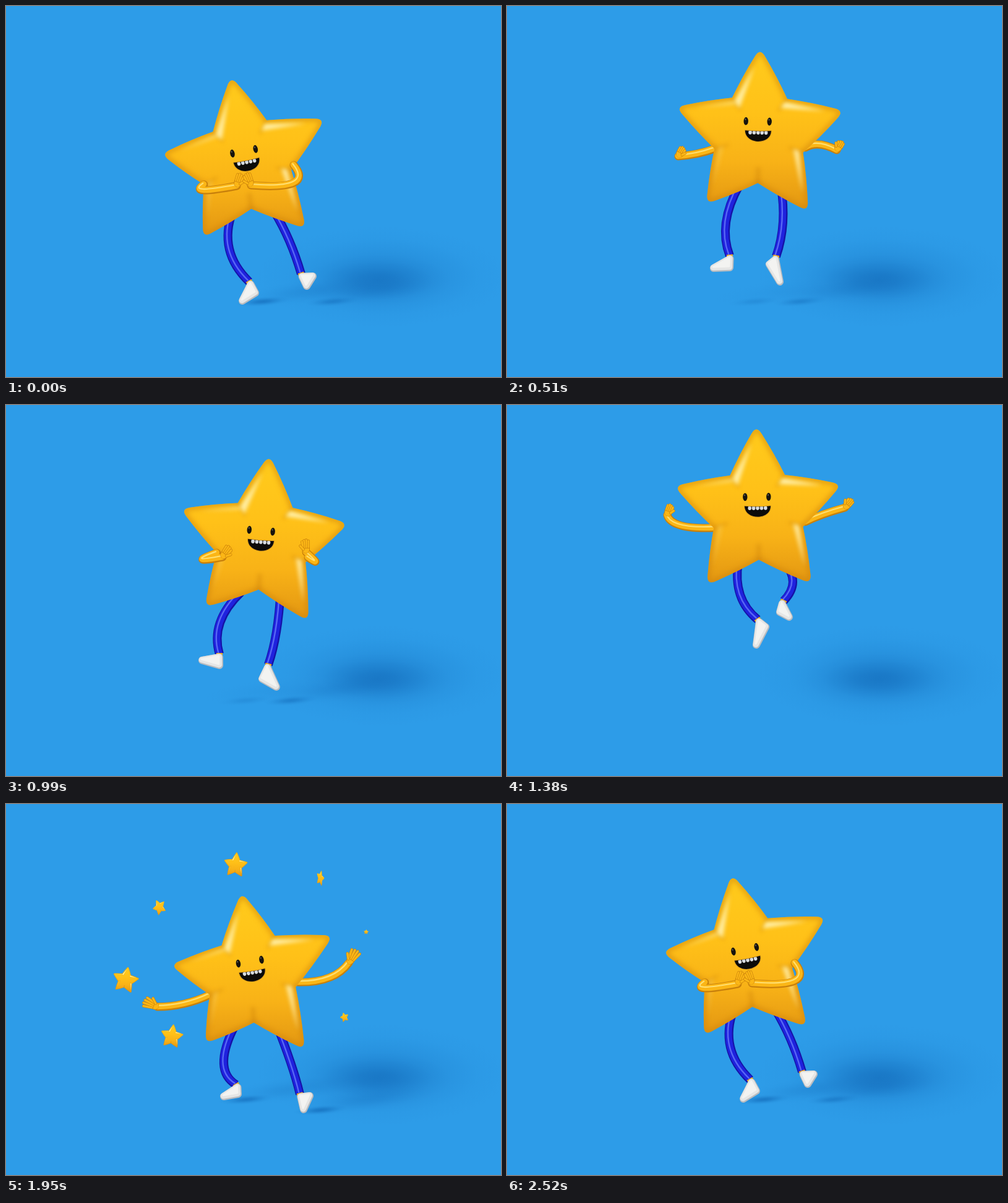
Animation, 800 px wide and 600 px high, one loop 2550 ms. Source, as an HTML page with a canvas:

```html
<!DOCTYPE html>
<html lang="en">
<head>
<meta charset="utf-8">
<title>Dancing star</title>
<style>
  html, body { margin: 0; width: 100%; height: 100%; overflow: hidden; background: #2d9ce8; }
  canvas { display: block; width: 800px; height: 600px; }
</style>
</head>
<body>
<canvas id="stage" width="800" height="600"></canvas>
<script>
const ctx = document.getElementById('stage').getContext('2d');
const LOOP = 2550, STEP = 30, TAU = Math.PI * 2;

// ---- Poses ----
// tips: top, right, lower right, lower left, left
// face: offset y, joy, hip spread
// arm: elbow, wrist, hand angle, openness, in front
// leg: knee, ankle, heel, toe
const clap = {
  tips: [364,119, 511,185, 481,356, 321,370, 256,240], face: [-19, 1, 1],
  armL: [320,298, 373,291, 290, .7, 1], armR: [465,286, 396,290, -112, .7, 1],
  legL: [361,393, 393,446, 403,464, 382,477], legR: [458,380, 477,433, 496,437, 486,453]
};
const hop = {
  tips: [409,73, 540,171, 484,328, 325,316, 278,165], face: [-24, 1, 1],
  armL: [307,239, 277,243, 300, .4, 0], armR: [505,224, 533,233, -60, .4, 0],
  legL: [354,350, 360,404, 360,423, 334,424], legR: [446,350, 435,405, 424,418, 441,446]
};
const lean = {
  tips: [425,86, 548,193, 486,345, 325,323, 287,170], face: [-20, 1, .95],
  armL: [318,250, 350,246, 305, .7, 1], armR: [500,253, 485,238, -95, .7, 1],
  legL: [346,352, 345,403, 345,421, 317,413], legR: [437,367, 424,420, 414,443, 437,456]
};
const leap = {
  tips: [403,38, 536,130, 489,285, 326,287, 275,133], face: [-26, 1, 1.1],
  armL: [281,195, 259,178, 290, .5, 0], armR: [511,177, 546,166, -50, .5, 0],
  legL: [377,307, 405,347, 418,359, 403,388], legR: [462,286, 447,317, 441,335, 456,343]
};
const sneeze = {
  tips: [351,141, 508,198, 460,391, 323,367, 258,264], face: [-9, 0, .25],
  armL: [291,310, 262,320, 155, 0, 0], armR: [472,291, 416,301, -160, 0, 1],
  legL: [371,405, 411,441, 426,455, 397,468], legR: [382,405, 369,460, 364,485, 335,491]
};
const burst = {
  tips: [381,148, 524,215, 480,393, 325,383, 271,261], face: [-25, 1, 1],
  armL: [288,323, 245,328, 202, 1, 0], armR: [522,281, 554,257, -58, 1, 0],
  legL: [352,418, 372,454, 375,469, 352,473], legR: [460,418, 475,469, 491,472, 481,494]
};

const shift = (a, n, dx, dy) => a.map((v, i) => i < n ? v + (i % 2 ? dy : dx) : v);
const move = (p, dx, dy) => ({
  tips: shift(p.tips, 10, dx, dy), face: p.face,
  armL: shift(p.armL, 4, dx, dy), armR: shift(p.armR, 4, dx, dy),
  legL: shift(p.legL, 8, dx, dy), legR: shift(p.legR, 8, dx, dy)
});
const flip = (a, n) => a.map((v, i) => i < n && i % 2 === 0 ? 808 - v : v);
const flipArm = (a, turn) => flip(a, 4).map((v, i) => i === 4 ? turn - v : v);
const mirror = p => {
  const m = flip(p.tips, 10);
  return {
    tips: [0, 4, 3, 2, 1].flatMap(i => [m[2 * i], m[2 * i + 1]]), face: p.face,
    armL: flipArm(p.armR, 180), armR: flipArm(p.armL, 180),
    legL: flip(p.legR, 8), legR: flip(p.legL, 8)
  };
};

const crouch = { ...move(leap, 0, 95), legL: burst.legL, legR: burst.legR };
const land = { ...move(leap, -25, 105), legL: burst.legL, legR: shift(sneeze.legR, 8, 8, 24) };
const tense = { ...move(sneeze, 1, 5), legL: sneeze.legL, legR: sneeze.legR };

const keys = [
  [0, clap], [170, mirror(hop)], [345, mirror(clap)], [510, hop], [690, clap],
  [850, mirror(hop)], [990, lean], [1050, mirror(clap)], [1150, crouch], [1380, leap],
  [1610, land], [1740, sneeze], [1830, tense], [1950, burst], [2130, burst],
  [2340, move(hop, 0, 18)], [2520, clap]
];

// Monotone cubic interpolation, so extremes stay at the keys.
const tangent = (a, b) => a * b <= 0 ? 0 : 2 * a * b / (a + b);
function poseAt(t) {
  t = Math.min(t, 2520);
  let i = 0;
  while (i < keys.length - 2 && t >= keys[i + 1][0]) i++;
  const [k0, k1, k2, k3] = [-1, 0, 1, 2].map(d => keys[Math.max(0, Math.min(keys.length - 1, i + d))]);
  const h = k2[0] - k1[0], u = (t - k1[0]) / h, out = {};
  const slope = (a, b, part, j) => a === b ? 0 : (b[1][part][j] - a[1][part][j]) / (b[0] - a[0]);
  for (const part in k1[1]) {
    out[part] = k1[1][part].map((v, j) => {
      const s = slope(k1, k2, part, j);
      const m1 = tangent(slope(k0, k1, part, j), s) * h;
      const m2 = tangent(s, slope(k2, k3, part, j)) * h;
      const w = k2[1][part][j], d = w - v;
      return v + u * (m1 + u * (3 * d - 2 * m1 - m2 + u * (m1 + m2 - 2 * d)));
    });
  }
  return out;
}

// ---- Drawing helpers ----
const mix = (a, b, k) => [a[0] + (b[0] - a[0]) * k, a[1] + (b[1] - a[1]) * k];
const pairs = a => a.slice(0, a.length & ~1).reduce((r, v, i) => (i % 2 ? r[r.length - 1].push(v) : r.push([v]), r), []);
const unit = (a, b) => {
  const l = Math.hypot(b[0] - a[0], b[1] - a[1]) || 1;
  return [(b[0] - a[0]) / l, (b[1] - a[1]) / l];
};

function line(color, width, trace) {
  ctx.strokeStyle = color;
  ctx.lineWidth = width;
  ctx.beginPath();
  trace();
  ctx.stroke();
}

function oval(x, y, rx, ry, color, turn = 0) {
  ctx.fillStyle = color;
  ctx.beginPath();
  ctx.ellipse(x, y, rx, ry, turn, 0, TAU);
  ctx.fill();
}

function softOval(x, y, rx, ry, alpha, turn = 0) {
  ctx.save();
  ctx.translate(x, y);
  ctx.rotate(turn);
  ctx.scale(rx, ry);
  const g = ctx.createRadialGradient(0, 0, 0, 0, 0, 1);
  [1, .8, .42, .12, 0].forEach((k, i) => g.addColorStop(i / 4, `rgba(8,88,168,${alpha * k})`));
  oval(0, 0, 1, 1, g);
  ctx.restore();
}

// Three-tone tube passing through its middle joint
function tube(a, mid, b, width, [edge, base, shine]) {
  const c = [2 * mid[0] - (a[0] + b[0]) / 2, 2 * mid[1] - (a[1] + b[1]) / 2];
  const trace = (dx, dy) => () => {
    ctx.moveTo(a[0] + dx, a[1] + dy);
    ctx.quadraticCurveTo(c[0] + dx, c[1] + dy, b[0] + dx, b[1] + dy);
  };
  line(edge, width, trace(0, 0));
  line(base, width * .76, trace(-.5, -.7));
  line(shine, width * .17, trace(-1.6, -2));
}

// ---- Star ----
function starShape(tips) {
  const c = [0, 1].map(k => tips.reduce((s, p) => s + p[k], 0) / 5);
  const dips = tips.map((p, i) => mix(mix(p, tips[(i + 1) % 5], .5), c, .32));
  return { tips, dips, c };
}

function traceStar({ tips, dips, c }) {
  ctx.beginPath();
  tips.forEach((tip, i) => {
    const before = dips[(i + 4) % 5], after = dips[i];
    const out = mix(tip, c, -.05);
    const near = mix(out, before, .2), far = mix(out, after, .2);
    const bow = (a, b) => mix(mix(a, b, .5), mix(tip, c, .45), -.06);
    if (!i) ctx.moveTo(...before);
    ctx.quadraticCurveTo(...bow(before, near), ...near);
    ctx.quadraticCurveTo(...out, ...far);
    ctx.quadraticCurveTo(...bow(far, after), ...after);
  });
  ctx.closePath();
}

function drawStar(shape, k) {
  const { tips, dips, c } = shape;
  const ys = tips.map(p => p[1]);
  const g = ctx.createLinearGradient(0, Math.min(...ys), 0, Math.max(...ys));
  [[0, '#ffcb1c'], [.4, '#ffc118'], [.7, '#f8b217'], [1, '#e39712']].forEach(s => g.addColorStop(...s));
  ctx.save();
  traceStar(shape);
  ctx.fillStyle = g;
  ctx.fill();
  ctx.clip();

  ctx.filter = `blur(${4 * k}px)`;
  ctx.globalAlpha = .6;
  ctx.strokeStyle = '#cf820a';
  ctx.lineWidth = 8 * k;
  traceStar(shape);
  ctx.stroke();

  // Creases between the arms
  ctx.filter = `blur(${3 * k}px)`;
  ctx.globalAlpha = .3;
  dips.forEach((d, i) => line('#c47808', (i === 2 ? 7 : 4) * k, () => {
    ctx.moveTo(...d);
    ctx.lineTo(...mix(d, c, .3));
  }));

  const glow = (tip, dip, inner, alpha) => {
    ctx.globalAlpha = alpha;
    ctx.fillStyle = '#fff3b4';
    ctx.beginPath();
    ctx.moveTo(...mix(mix(tip, dip, .2), c, .07));
    ctx.lineTo(...mix(dip, c, .09));
    ctx.lineTo(...mix(dip, c, inner));
    ctx.fill();
  };
  glow(tips[0], dips[4], .27, .9);
  glow(tips[1], dips[0], .24, .95);
  glow(tips[4], dips[4], .16, .6);
  glow(tips[2], dips[1], .22, .85);
  glow(tips[3], dips[3], .2, .22);
  ctx.restore();
}

function drawFace({ tips, c }, [dy, joy]) {
  const [r, l] = [tips[1], tips[4]];
  ctx.save();
  ctx.translate(c[0] - 2, c[1] + dy);
  ctx.rotate(Math.atan2(r[1] - l[1], r[0] - l[0]) * .9);
  for (const x of [-19, 19]) {
    oval(x, 0, 3.7, 1.2 + 5.2 * joy, '#17130c');
    if (joy > .6) oval(x - .8, -3, 1, 1.5, '#5d5a52');
  }
  if (joy < .4) {
    line('#5a3a06', 1.8, () => {
      ctx.moveTo(-21, 18);
      ctx.quadraticCurveTo(-4, 12, 25, 20);
    });
  } else {
    const drop = 18 * joy;
    const mouth = () => {
      ctx.beginPath();
      ctx.moveTo(-20, 15);
      ctx.quadraticCurveTo(1, 17, 22, 15);
      ctx.bezierCurveTo(22, 15 + drop * 1.28, -19, 15 + drop * 1.28, -20, 15);
      ctx.closePath();
    };
    mouth();
    ctx.strokeStyle = '#d99a1c';
    ctx.lineWidth = 2;
    ctx.stroke();
    ctx.fillStyle = '#0c0b0a';
    ctx.fill();
    ctx.clip();
    for (let i = -2; i < 3; i++) oval(1 + i * 6.4, 18, 2.8, 3.3, '#d9dde2');
  }
  ctx.restore();
}

// ---- Limbs ----
const SKIN = ['#c8800c', '#fbb616', '#ffdf70'], JEANS = ['#1512a6', '#1f22de', '#5868f4'];

function drawArm(from, [ex, ey, wx, wy, angle, open], side) {
  tube(from, [ex, ey], [wx, wy], 13, SKIN);
  ctx.save();
  ctx.translate(wx, wy);
  ctx.rotate(angle * Math.PI / 180);
  ctx.scale(1, side);
  oval(6, 0, 8, 6.6, SKIN[0]);
  oval(5.5, 0, 7.2, 5.7, SKIN[1]);
  const reach = 11 + 13 * open, fan = 1 + Math.max(0, open - .6) * 1.7;
  for (let i = 0; i < 5; i++) {
    const y = (i - 1.5) * 2.9;
    const finger = () => {
      if (i < 4) {
        ctx.moveTo(8, y);
        ctx.lineTo(reach - Math.abs(i - 1.3) * 1.8, y * fan);
      } else {
        ctx.moveTo(5, 4);
        ctx.lineTo(8 + 4 * open, 5 + 5 * open);
      }
    };
    line(SKIN[0], 4.6, finger);
    line(SKIN[1], 3.3, finger);
  }
  ctx.restore();
}

function drawLeg(hip, leg) {
  const [knee, ankle, heel, toe] = pairs(leg);
  const d = unit(knee, ankle), top = [ankle[0] + d[0] * 5, ankle[1] + d[1] * 5];
  ctx.lineCap = 'butt';
  tube(hip, knee, ankle, 14, JEANS);
  line('#f5ac14', 10, () => {
    ctx.moveTo(ankle[0] - d[0] * 2, ankle[1] - d[1] * 2);
    ctx.lineTo(...top);
  });
  ctx.lineCap = 'round';
  const shoe = (color, width, dx, dy) => {
    ctx.fillStyle = color;
    line(color, width, () => {
      ctx.moveTo(top[0] + dx, top[1] + dy);
      ctx.lineTo(heel[0] + dx, heel[1] + dy);
      ctx.lineTo(toe[0] + dx, toe[1] + dy);
      ctx.closePath();
      ctx.fill();
    });
  };
  shoe('#b9bcc0', 12, 0, 0);
  shoe('#e6e6e5', 9.5, -.6, -1);
  shoe('#f3f3f1', 3, -1, -2);
}

// ---- Small stars: offset, radius, width, phase ----
const sparks = [
  [-25, -176, 21, .95, .1], [112, -155, 13, .5, .3], [-148, -108, 13, .85, -.5], [-203, 10, 22, 1, .2],
  [-128, 101, 20, .95, .15], [151, 70, 8, .9, -.3], [186, -68, 4, 1, .1]
];

function drawSparks(t) {
  const u = (t - 1800) / 400;
  if (u <= 0 || u >= 1) return;
  const travel = 1 - (1 - u) ** 4, ref = 1 - .625 ** 4;
  const size = Math.min(1, u / .3) * Math.min(1, (1 - u) / .6);
  const turn = (t - 1950) / 260;
  for (const [dx, dy, r, wide, phase] of sparks) {
    const a0 = phase + turn * .5;
    const tips = Array.from({ length: 5 }, (_, i) => {
      const a = a0 - TAU / 4 + i * TAU / 5;
      return [Math.cos(a) * r, Math.sin(a) * r];
    });
    ctx.save();
    ctx.translate(396 + dx * travel / ref, 275 + dy * travel / ref);
    ctx.scale(size * wide * Math.cos(turn), size);
    drawStar(starShape(tips), r / 135);
    ctx.restore();
  }
}

// ---- Scene ----
function drawShadow(pose) {
  softOval(608, 438, 205, 82, .3);
  softOval(600, 444, 120, 42, .34);
  for (const leg of [pose.legL, pose.legR]) {
    const x = (leg[4] + leg[6]) / 2, y = Math.max(leg[5], leg[7]) + 5;
    const lift = Math.max(0, 482 - y), near = Math.max(0, 1 - lift / 85);
    const ground = Math.max(y, 482) - 4;
    softOval(x + 22 + lift * .6, ground, 44, 8, .5 * near, -.08);
    softOval(x + 95, ground - 16, 115, 20, .16 * near, -.12);
  }
}

function draw(t) {
  const pose = poseAt(t), shape = starShape(pairs(pose.tips));
  const [, dipR, notch, dipL] = shape.dips, spread = pose.face[2];
  const arms = [
    [dipL, pose.armL, 1],
    [[dipR[0] + 4, dipR[1] - 8], pose.armR, -1]
  ];
  const drawArms = front => arms.forEach(a => { if ((a[1][6] > .5) === front) drawArm(...a); });

  ctx.fillStyle = '#2d9ce8';
  ctx.fillRect(0, 0, 800, 600);
  ctx.lineCap = ctx.lineJoin = 'round';
  drawShadow(pose);
  drawSparks(t);
  drawLeg([notch[0] - 30 * spread, notch[1] + 4], pose.legL);
  drawLeg([notch[0] + 34 * spread + 3, notch[1] + 4], pose.legR);
  drawArms(false);
  drawStar(shape, 1);
  drawFace(shape, pose.face);
  drawArms(true);
}

const start = performance.now();
function frame() {
  const t = (performance.now() - start) % LOOP;
  draw(Math.floor(t / STEP) * STEP);
  requestAnimationFrame(frame);
}
frame();
</script>
</body>
</html>
```
